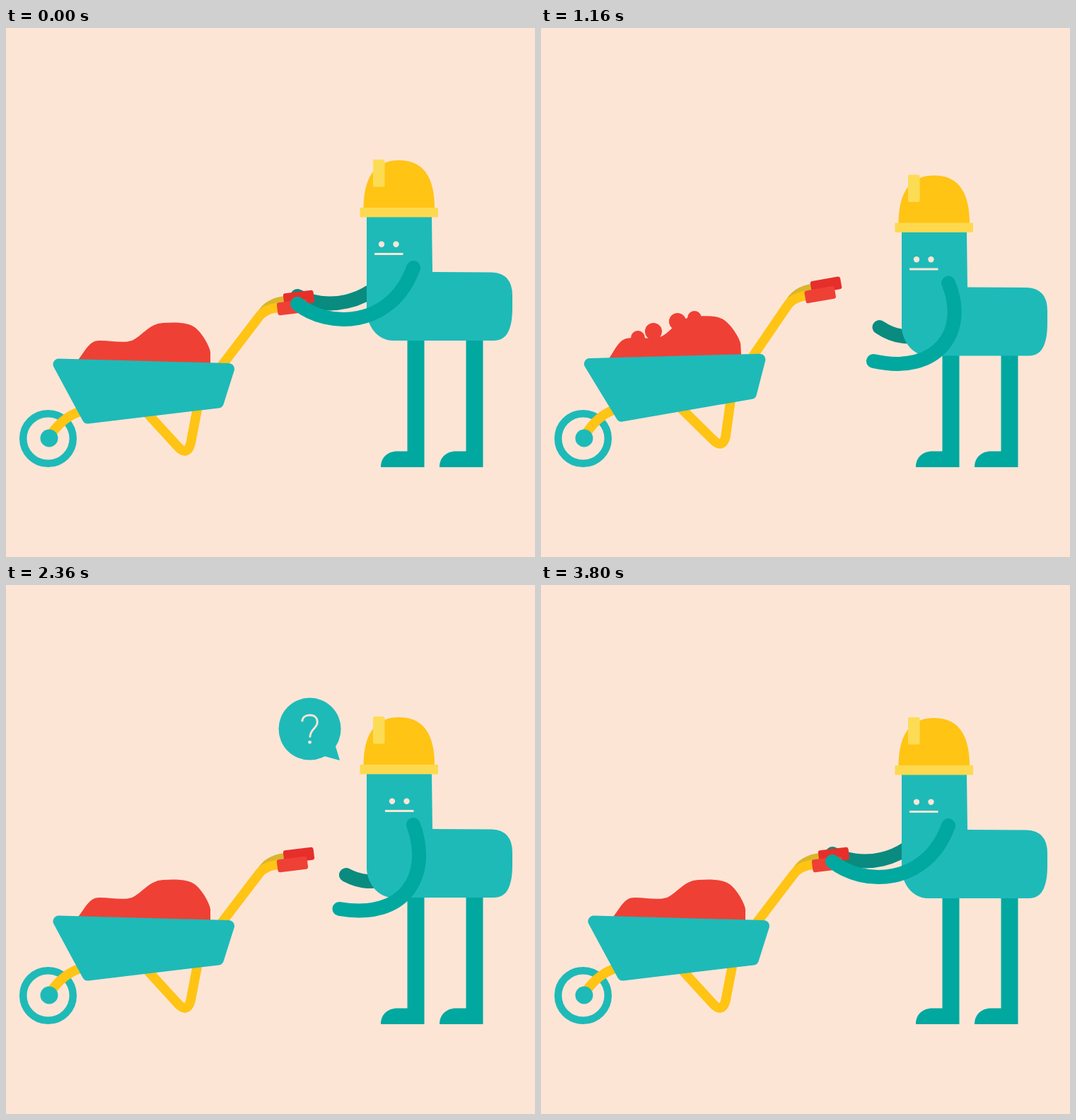
An HTML page for the animation above (3840 ms loop, 748 by 748 pixels).

```html
<!DOCTYPE html>
<html lang="en">
<head>
<meta charset="utf-8">
<title>Wheelbarrow</title>
<style>
  html, body { margin: 0; width: 100%; height: 100%; overflow: hidden; background: #fde5d6; }
  svg { display: block; width: 100%; height: 100%; }
  .teal { fill: #1ebab8; }
  .limb { fill: #00a8a0; }
  .cream { fill: #fde5d6; }
  .red { fill: #ef4035; }
  .line { fill: none; stroke: #ffc414; stroke-width: 13.5; }
  .arm { fill: none; stroke-width: 20; stroke-linecap: round; }
</style>
</head>
<body>
<svg viewBox="0 0 748 748">
  <defs>
    <path id="leg" class="limb" d="M567.5 410H591.5V621H530C530 607 540 598.5 553 598.5H567.5Z"/>
    <rect id="grip" x="-21.5" y="-9" width="43" height="18" rx="3"/>
  </defs>

  <circle cx="59.5" cy="580.5" r="35.3" fill="none" stroke="#1ebab8" stroke-width="10.5"/>
  <path id="backArm" class="arm" stroke="#098b80"/>
  <g id="barrow">
    <path class="line" d="M64 574Q82 549 106 542"/>
    <path class="line" d="M200 545L243 592Q256 606 261 588L271 536"/>
    <path class="line" style="stroke:#d9b62c;stroke-width:12" d="M360 406Q370 387 396 385"/>
    <path class="line" d="M300 484L358 408Q367 396 390 395"/>
    <use href="#grip" fill="#e62f2a" transform="translate(414 382) rotate(-7)"/>
    <use href="#grip" class="red" transform="translate(405 395) rotate(-7)"/>
    <path class="red" d="M103 468C113 455 118 442 132 442C150 442 165 446 178 442C192 436 202 418 222 417C240 416 258 416 268 424C280 434 290 455 289 460V480H95Z"/>
  </g>
  <g id="pebbles" class="red"></g>
  <path id="tray" class="teal" stroke="#1ebab8" stroke-width="16" stroke-linejoin="round" d="M74.5 475.5L315 482L300 529.5L115.5 551.5Z"/>
  <circle class="teal" cx="61" cy="580" r="12.5"/>

  <use href="#leg"/>
  <use href="#leg" x="83"/>
  <g id="body">
    <path class="teal" d="M510 262H602V268L603 345L687 345.5Q716 347 716 378V396C716 428 707 442 690 442H547C525 442 510 420 510 400Z"/>
    <path fill="#ffc414" d="M505.5 255C505.5 220 516 187 556 187C596 187 606 220 606 255Z"/>
    <rect x="500.5" y="254" width="110.5" height="13.5" fill="#fdd94f"/>
    <rect x="519" y="186" width="16.5" height="38.5" rx="2" fill="#fddc55"/>
    <g id="face" class="cream">
      <circle cx="531" cy="305.8" r="4.2"/>
      <circle cx="551.5" cy="305.8" r="4.2"/>
      <rect x="521" y="318" width="40.5" height="3"/>
    </g>
  </g>
  <path id="frontArm" class="arm" stroke="#00a8a0"/>

  <g id="bubble">
    <path class="teal" d="M0 0L-22 -6L-30 -30L-6 -20Z"/>
    <g transform="translate(-40.8 -42.7)">
      <circle class="teal" r="42.3"/>
      <path fill="none" stroke="#fde5d6" stroke-width="2.7" d="M-10.3 -10C-10.3 -15.5 -6 -18.8 0 -18.8S10.3 -15.5 10.3 -9.5C10.3 -1 .3 0 .3 11.5"/>
      <circle class="cream" cy="18" r="2.3"/>
    </g>
  </g>
</svg>
<script>
const LOOP = 3840, STEP = 40;
const $ = id => document.getElementById(id);
const clamp = x => Math.min(1, Math.max(0, x));
const smooth = x => x * x * (3 - 2 * x);

// Eased interpolation through [time, values] keys.
function track(t, keys) {
  let i = 0;
  while (i < keys.length - 2 && t >= keys[i + 1][0]) i++;
  const [t0, a] = keys[i], [t1, b] = keys[i + 1];
  const k = smooth(clamp((t - t0) / (t1 - t0)));
  return a.map((v, n) => v + (b[n] - v) * k);
}

// Two control points and the hand, relative to the body.
const FRONT = {
  grip: [545, 425, 455, 425, 412, 390],
  lift: [510, 383.5, 430, 383.5, 368, 354.5],
  drop: [604, 406, 563, 470, 470, 449.5],
  hang: [602, 410, 565, 474, 471.5, 458]
};
const BACK = {
  grip: [515, 395, 450, 398, 412, 379],
  lift: [500, 349.5, 430, 349.5, 370, 342.5],
  drop: [580, 405, 527, 434, 478.5, 401.5],
  hang: [580, 405, 530, 436, 481, 410]
};
const armKeys = p => [[0, p.grip], [680, p.lift], [930, p.lift], [1150, p.drop],
  [1180, p.drop], [1600, p.hang], [3480, p.hang], [3770, p.grip]];
const frontKeys = armKeys(FRONT), backKeys = armKeys(BACK);
const bodyKeys = [[0, [0]], [680, [-21.5]], [920, [-21.5]], [1160, [21.5]], [1195, [21.5]],
  [1670, [0]], [3480, [0]], [3640, [10]], [LOOP, [0]]];
const faceKeys = [[1400, [0]], [1650, [15]], [3440, [15]], [3680, [0]]];

const PEBBLES = [[137, 438, 10, .8], [159, 429, 12, 1], [193, 415, 12, 1.2], [217, 410, 10, .9]];
const pebbles = PEBBLES.map(([x, , r]) => {
  const c = document.createElementNS('http://www.w3.org/2000/svg', 'circle');
  c.setAttribute('cx', x);
  c.setAttribute('r', r);
  return $('pebbles').appendChild(c);
});

// Lift, then a free fall with damped bounces.
function tilt(t) {
  const height = 10.6, bounce = .536;
  if (t < 940) return -height * smooth(clamp(t / 680));
  let half = 140, h = height, u = t - 940;
  while (u > half && h > .05) {
    u -= half;
    half *= bounce;
    h *= bounce * bounce;
    u -= half;
  }
  return h > .05 ? -h * (1 - (u / half) ** 2) : 0;
}

function bubbleScale(t) {
  const s = (t - 1640) / 1000;
  const grow = s < 0 ? clamp(1 + s / .148)
    : 1 + .465 * Math.sin(4 * Math.PI * s) * Math.exp(-2 * s);
  return grow * clamp((3710 - t) / 150);
}

function drawArm(id, x, y, keys, t, dy) {
  const p = track(t, keys);
  $(id).setAttribute('d', `M${x} ${y}C${p}`);
  $(id).setAttribute('transform', `translate(0 ${dy})`);
}

function draw(t) {
  const [dy] = track(t, bodyKeys);
  const turn = `rotate(${tilt(t)} 60.5 580.5)`;
  $('barrow').setAttribute('transform', turn);
  $('tray').setAttribute('transform', turn);
  $('body').setAttribute('transform', `translate(0 ${dy})`);
  $('face').setAttribute('transform', `translate(${track(t, faceKeys)[0]} 0)`);
  drawArm('frontArm', 576, 339, frontKeys, t, dy);
  drawArm('backArm', 550, 335, backKeys, t, dy);

  $('pebbles').style.display = t > 1080 && t < 1480 ? '' : 'none';
  const rise = 15.75 - .00109 * (t - 1280) ** 2;
  pebbles.forEach((c, i) => c.setAttribute('cy', PEBBLES[i][1] - rise * PEBBLES[i][3]));

  $('bubble').setAttribute('transform', `translate(472 248) scale(${bubbleScale(t)})`);
}

function tick() {
  draw(Math.floor(performance.now() % LOOP / STEP) * STEP);
  requestAnimationFrame(tick);
}
tick();
</script>
</body>
</html>
```
